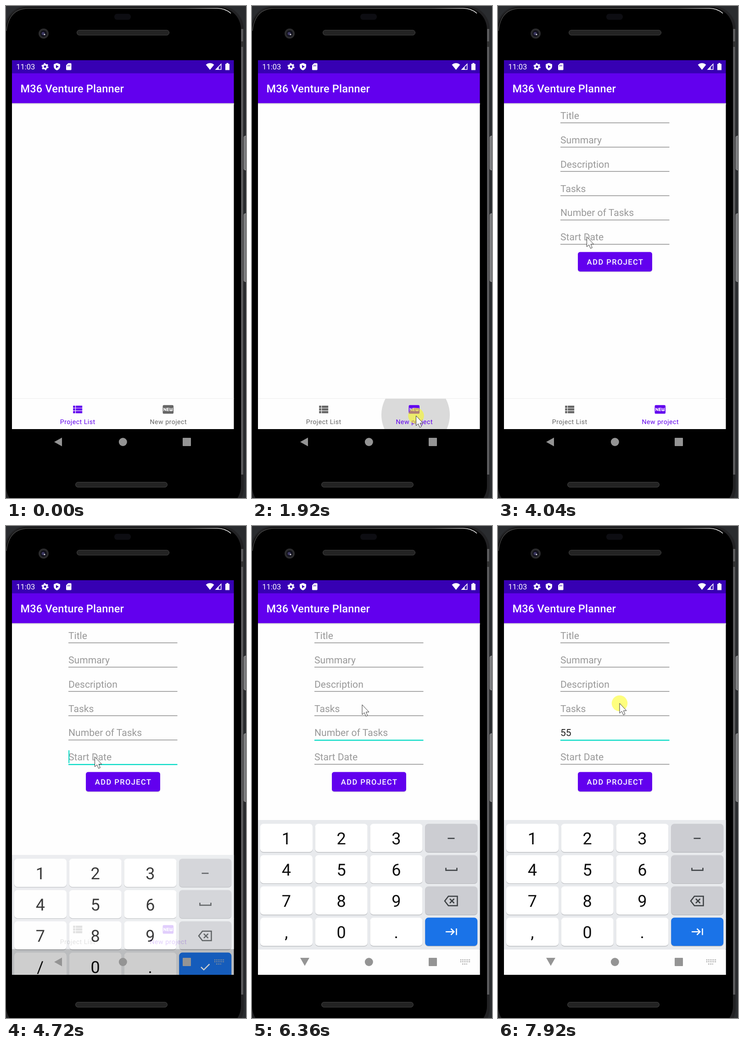
Write an HTML page that moves like this. It is 523 px wide and 1071 px high and loops after 7990 ms.

```html
<!DOCTYPE html>
<html lang="en">
<head>
<meta charset="utf-8">
<title>Project form demo</title>
<style>
html, body { margin: 0; width: 100%; height: 100%; overflow: hidden; background: #2a2c2f; }
svg { display: block; width: 100%; height: 100%; font-family: Roboto, sans-serif; text-rendering: geometricPrecision; }
.tab { font-size: 14.1px; letter-spacing: .5px; text-anchor: middle; }
.field { font-size: 21.1px; fill: #999; }
.digit { font-size: 36px; fill: #0c0c0c; text-anchor: middle; }
.line { fill: none; stroke: #3c4043; stroke-width: 2.5; }
.blue { stroke: #fff; }
</style>
</head>
<body>
<svg viewBox="0 0 523 1071">
  <defs>
    <linearGradient id="rail">
      <stop offset="0" stop-color="#2a2a2b"/><stop offset=".5" stop-color="#6c6c6e"/><stop offset="1" stop-color="#2a2a2c"/>
    </linearGradient>
    <linearGradient id="glint">
      <stop offset="0" stop-color="#444"/><stop offset=".8" stop-color="#777"/><stop offset="1" stop-color="#eee"/>
    </linearGradient>
    <linearGradient id="shadow" x2="0" y2="1">
      <stop offset="0" stop-color="#ccc"/><stop offset="1" stop-color="#fefefe"/>
    </linearGradient>
    <pattern id="mesh" width="3" height="3" patternUnits="userSpaceOnUse">
      <rect width="3" height="3" fill="#1c1c1c"/><path d="M0 0h1.5v1.5h-1.5z" fill="#383838"/>
    </pattern>
    <clipPath id="screen"><path d="M13 118H496.5V977H13Z"/></clipPath>
    <clipPath id="tabBar"><path d="M13 855H496.5V921H13Z"/></clipPath>
  </defs>

  <!-- handset -->
  <rect width="523" height="1071" fill="#2a2c2f"/>
  <g fill="#77787a" stroke="#a5a5a5">
    <rect x="518.5" y="283" width="9" height="74" rx="3"/>
    <rect x="518.5" y="452" width="9" height="148" rx="3"/>
  </g>
  <rect x="-3" y="0" width="521" height="1100" rx="50" fill="#222224"/>
  <path d="M511 50H518V1020H511Z" fill="url(#rail)"/>
  <path d="M511 77H518V89H511Z" fill="#333"/>
  <rect x="0" y="3" width="512" height="1090" rx="48"/>
  <path d="M1 54Q6 6 48 5H460Q478 5 490 16" fill="none" stroke="url(#glint)" stroke-width="1.5"/>
  <rect x="236" y="17" width="36" height="13" rx="6" fill="#0d0d12"/>
  <g fill="url(#mesh)" stroke="#444">
    <rect x="154.5" y="52.5" width="201" height="11" rx="5.5"/>
    <rect x="151.5" y="1036.5" width="200" height="11" rx="5.5"/>
  </g>
  <circle cx="82" cy="60" r="11" fill="#2b2b2d"/><circle cx="82" cy="60" r="7" fill="#11111b"/>
  <circle cx="81" cy="60" r="3.5" fill="#3c3860"/><circle cx="84" cy="62" r="1.6" fill="#ddd"/>

  <g clip-path="url(#screen)">
    <path d="M13 118H497V977H13Z"/>
    <path d="M13 211H497V921H13Z" fill="#fefefe"/>
    <path d="M13 211H497V215H13Z" fill="url(#shadow)"/>
    <path d="M13 146H497V211.5H13Z" fill="#6200ee"/>
    <path d="M13 118H497V146.5H13Z" fill="#3700b3"/>
    <g fill="#fff">
      <text x="22.3" y="138.3" font-size="16.5">11:03</text>
      <text x="31.5" y="188" font-size="23.5" font-weight="500" letter-spacing=".2">M36 Venture Planner</text>
      <g fill="none" stroke="#fff">
        <circle cx="85" cy="132" r="4.3" stroke-width="3.4"/>
        <circle cx="85" cy="132" r="6.5" stroke-width="2.4" stroke-dasharray="3.4 3.407"/>
      </g>
      <path d="M111 124L118 126.7V132Q117 138 111 140Q105 138 104 132V126.7Z"/>
      <path d="M109 128.5V135.5L115 132Z" fill="#3700b3"/>
      <path d="M135.5 124.5H141Q142.5 124.5 142.5 126V138Q142.5 139.5 141 139.5H132.5Q131 139.5 131 138V129Z"/>
      <path d="M134 129v2.5M136.500 128v3.5M139 128v3.5" stroke="#3700b3"/>
      <path d="M435.5 127.7Q444.5 121 453.5 127.7L444.5 139Z"/>
      <path d="M469.5 124.5V139H455.5Z"/><path d="M468 128.5V137.5H463.5V133Z" fill="#3700b3"/>
      <path d="M478 126H480.5V124H484.5V126H487V139.5H478Z"/>
    </g>

    <g id="form">
      <g id="fields"></g>
      <rect id="caret" width="2" height="28" fill="#03dac5"/>
      <rect x="174" y="537.5" width="162" height="42" rx="5" fill="#ddd"/>
      <rect x="174" y="535.5" width="162" height="42.5" rx="5" fill="#6200ee"/>
      <text x="255.7" y="563.2" font-size="16.45" font-weight="500" letter-spacing="1.47" text-anchor="middle" fill="#fff">ADD PROJECT</text>
    </g>

    <path d="M13 854H497V855H13Z" fill="#ededed"/>
    <g clip-path="url(#tabBar)"><circle id="ripple" cx="356.5" cy="890" fill="#dadada"/></g>
    <g id="listTab">
      <path transform="translate(141.5 864.1) scale(1.175)" d="M4 14h4v-4H4v4zm0 5h4v-4H4v4zM4 9h4V5H4v4zm5 5h12v-4H9v4zm0 5h12v-4H9v4zM9 5v4h12V5H9z"/>
      <text class="tab" x="156.2" y="909.5">Project List</text>
    </g>
    <g id="newTab">
      <path transform="translate(339.2 864.1) scale(1.175)" d="M20 4H4c-1.11 0-2 .89-2 2v12c0 1.11.89 2 2 2h16c1.11 0 2-.89 2-2V6c0-1.11-.89-2-2-2zM8.5 15H7.3l-2.55-3.5V15H3.5V9h1.2l2.6 3.5V9h1.2v6zm5-4.74H11v1.12h2.5v1.26H11v1.11h2.5V15h-4V9h4v1.26zm7 3.74c0 .55-.45 1-1 1h-4c-.55 0-1-.45-1-1V9h1.25v4.51h1.13V9.99h1.25v3.51h1.12V9h1.25v5z"/>
      <text class="tab" x="353.8" y="909.5">New project</text>
    </g>

    <g id="keyboard">
      <path d="M13 640H497V1060H13Z" fill="#e8eaed"/>
      <path d="M13 922H497V1060H13Z" fill="#fefefe"/>
      <g id="keys"></g>
      <path class="line" d="M426.5 680H441.5"/>
      <path class="line" d="M422.5 744V749.5H446.5V744"/>
      <path class="line" d="M428 806H447.5V826.5H428L420 816.2ZM431 811.5L440.5 821M440.5 811.5L431 821"/>
      <path class="line blue" id="done" d="M425 884L431 890L443.5 877.5"/>
      <path class="line blue" id="next" d="M422 883.3H440M433.5 876.5L440.3 883.3L433.5 890M445.5 876V890.5"/>
    </g>

    <g fill="#949494">
      <path id="back"/>
      <circle cx="254.8" cy="949" r="9"/>
      <rect x="385" y="940" width="18" height="18" rx="1"/>
      <path id="switcher" d="M454 944.5H475M454 948.5H475M458 953.5H470" fill="none" stroke="#949494" stroke-width="2" stroke-dasharray="2 1.8"/>
    </g>
  </g>

  <circle id="press" r="17.3" fill="#ff0" fill-opacity=".5"/>
  <path id="pointer" d="M0 0V21.5L4.8 17.3L8.2 25.2L11.8 23.6L8.5 16H15Z" fill="#fff" stroke="#222" stroke-width=".9"/>
</svg>

<script>
const $ = id => document.getElementById(id);
const LOOP = 7990, FIELD_GAP = 52.85, PRESS_LENGTH = 210;
const TAB_TAP = 1720, DATE_TAP = 4370, NUMBER_TAP = 5610, KEY_TAP = 6920, LAST_TAP = 7840;
const TAPS = [TAB_TAP, DATE_TAP, NUMBER_TAP, KEY_TAP, LAST_TAP];

// Pointer strokes: each leaves from where the one before ended, bowed sideways by an optional bend.
const ENTRY = { x: 428, y: 1012 };
const STROKES = [
  { from: 120, to: 330, x: 388, y: 909 },
  { from: 530, to: 1090, x: 352, y: 863, bend: [-75, -80] },
  { from: 1290, to: 1430, x: 357.5, y: 892 },
  { from: 2700, to: 3480, x: 217, y: 298, bend: [40, -60] },
  { from: 3550, to: 4040, x: 193.5, y: 502.5 },
  { from: 4770, to: 5535, x: 219.5, y: 446 },
  { from: 6080, to: 6360, x: 240, y: 389 },
  { from: 6550, to: 6950, x: 144, y: 771 },
  { from: 7150, to: LAST_TAP, x: 265, y: 386 }
];

const clamp = v => Math.min(1, Math.max(0, v));
const progress = (t, from, to) => clamp((t - from) / (to - from));
const easeOut = p => 1 - (1 - p) ** 2;
const show = (id, on) => { $(id).style.display = on ? "" : "none"; };
const set = (node, attrs) => Object.entries(attrs).forEach(([k, v]) => node.setAttribute(k, v));

$("fields").innerHTML = ["Title", "Summary", "Description", "Tasks", "Number of Tasks", "Start Date"]
  .map((hint, i) => `<text class="field" x="136" y="${246 + i * FIELD_GAP}">${hint}</text>
    <rect x="136" width="237.5"/>`).join("");
const labels = [...document.querySelectorAll("#fields text")];
const underlines = [...document.querySelectorAll("#fields rect")];

$("keys").innerHTML = [..."123 456 789 /0. "].map((label, i) => {
  const col = i % 4, row = i >> 2, x = 18 + col * 119.75, y = 648.3 + row * 68.1;
  const fill = col < 3 ? "#fff" : row < 3 ? "#cccdd2" : "#1a73e8";
  const cap = (top, color) => `<rect x="${x}" y="${top}" width="114" height="61.5" rx="7" fill="${color}"/>`;
  return cap(y + 1.2, "#b4b6ba") + cap(y, fill) +
    `<text class="digit" x="${x + 56.8}" y="${y + 44.7}">${label}</text>`;
}).join("");
const symbolKey = document.querySelectorAll("#keys text")[12];

function pointerAt(t) {
  let { x, y } = ENTRY;
  for (const { from, to, x: endX, y: endY, bend = [0, 0] } of STROKES) {
    const p = progress(t, from, to), bow = Math.sin(Math.PI * p);
    x += (endX - x) * p + bend[0] * bow;
    y += (endY - y) * p + bend[1] * bow;
  }
  return { x, y };
}

function drawTabs(t) {
  const onNew = t >= TAB_TAP + 70;
  set($("listTab"), { fill: onNew ? "#666" : "#6200ee" });
  set($("newTab"), { fill: onNew ? "#6200ee" : "#666" });
  set($("ripple"), {
    r: 104 * easeOut(progress(t, 1790, 2070)),
    opacity: 1 - progress(t, 2100, 2450)
  });
}

function drawForm(t) {
  const numberFocus = NUMBER_TAP + 130, dateFocus = DATE_TAP + 134;
  const text = "55".slice(0, t < 7000 ? 0 : t < 7300 ? 1 : 2);
  const focus = t >= numberFocus ? 4 : t >= dateFocus ? 5 : -1;
  const blinkStart = [t >= 7300 && 7300, t >= 7000 && 7000, focus === 4 && numberFocus, dateFocus].find(Boolean);

  underlines.forEach((line, i) => set(line, {
    y: 253.8 + i * FIELD_GAP,
    height: i === focus ? 2.3 : 1.2,
    fill: i === focus ? "#03dac5" : "#757575"
  }));
  labels[4].textContent = text || "Number of Tasks";
  labels[4].style.fill = text ? "#222" : "";
  set($("caret"), { x: 136.2 + text.length * 11.6, y: 224 + focus * FIELD_GAP });
  show("caret", focus >= 0 && Math.floor((t - blinkStart) / 500) % 2 === 0);
  show("form", t >= 2015);
}

function drawKeyboard(t) {
  const p = progress(t, 4570, 4850), numeric = t >= NUMBER_TAP + 130;
  set($("keyboard"), { transform: `translate(0 ${165 * (1 - p)})`, opacity: clamp(1.5 * p) });
  symbolKey.textContent = numeric ? "," : "/";
  show("done", !numeric);
  show("next", numeric);
  show("switcher", p > 0);
  set($("back"), { d: p === 1 ? "M105 940H125L115 957.5Z" : "M105 949L122 939.5V958.5Z" });
}

function draw(t) {
  drawTabs(t);
  drawForm(t);
  drawKeyboard(t);

  const { x, y } = pointerAt(t);
  set($("pointer"), { transform: `translate(${x} ${y})` });
  set($("press"), { cx: x, cy: y });
  show("pointer", t >= STROKES[0].from);
  show("press", TAPS.some(tap => t >= tap && t < tap + PRESS_LENGTH));
}

const begin = performance.now();
function tick() {
  draw((performance.now() - begin) % LOOP);
  requestAnimationFrame(tick);
}
tick();
</script>
</body>
</html>
```
